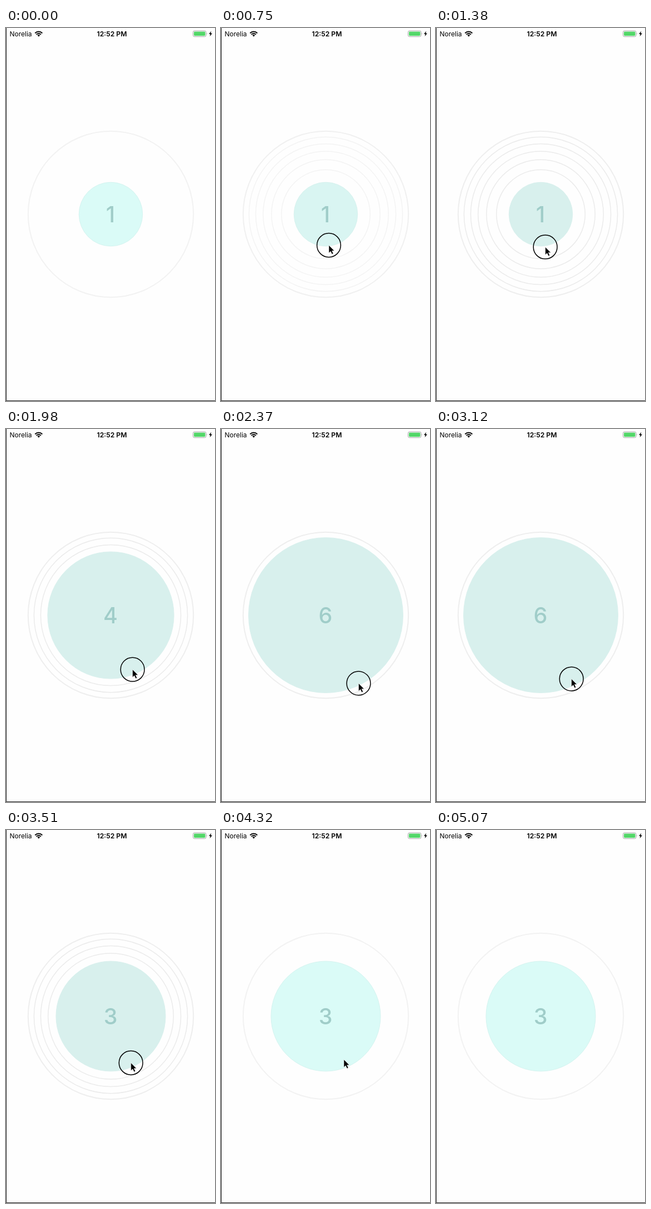
Write an HTML page that moves like this. It is 376 by 668 pixels and loops after 5.1 s.

```html
<!DOCTYPE html>
<html lang="en">
<head>
<meta charset="utf-8">
<title>Level dial</title>
<style>
  html, body { margin: 0; width: 100%; height: 100%; overflow: hidden; background: #fefefe; }
  svg { display: block; width: 100%; height: 100%; }
  text { font-family: Inter, "Liberation Sans", sans-serif; }
</style>
</head>
<body>
<svg viewBox="0 0 376 668">
  <rect width="376" height="668" fill="#fefefe"/>

  <g fill="none" transform="translate(188.5 333.5)">
    <circle id="outer" r="148.7" stroke-width="2"/>
    <g id="rings" stroke="#ebebeb" stroke-width="1.5"></g>
    <circle id="disc"/>
    <text id="num" x="-.5" y="14.5" font-size="39.5" font-weight="500" text-anchor="middle" fill="#a0cdc9"></text>
  </g>

  <g>
    <text x="6.5" y="14.5" font-size="12">Norelia</text>
    <g fill="none" stroke="#000" stroke-width="2">
      <path d="M52.3 9.2a9.2 9.2 0 0 1 13 0"/>
      <path d="M54.6 11.6a6 6 0 0 1 8.4 0"/>
    </g>
    <path d="M58.8 15.6l-2.3-2.4a3.3 3.3 0 0 1 4.6 0z"/>
    <text x="190.5" y="14.5" font-size="12.2" font-weight="600" text-anchor="middle">12:52 PM</text>
    <rect x="336.5" y="5" width="23.5" height="10.5" rx="2.6" fill="none" stroke="#a6a6a6"/>
    <rect x="338" y="6.5" width="20.5" height="7.5" rx="1.4" fill="#53d769"/>
    <path d="M361.3 8.5q1.6 1.7 0 3.5z" fill="#a6a6a6"/>
    <path d="M369.3 5.5l-4.3 5.3h2.6l-1 4.2 4.4-5.4h-2.7z"/>
  </g>

  <g id="cursor">
    <circle id="press" r="21.4" fill="none" stroke="#000" stroke-width="1.5"/>
    <path d="M0 0V14l3.2-3 2.5 5.2 2.4-1.1L5.7 10H10z" stroke="#fff" stroke-width=".6"/>
  </g>

  <path d="M.5 0V667.5H376" fill="none" stroke="#222"/>
</svg>
<script>
const LOOP = 5100, STEP = 30;
const CENTER = { x: 188.5, y: 333.5 };
const COUNT = 7, RADIUS = 149.2;
const DOWN = 570, UP = 3930, FADE = 330;

const below = { x: 206, y: 690 }, grab = { x: 194, y: 389 };
const far = { x: 252, y: 461 }, rest = { x: 221, y: 411 };
const away = { x: 240, y: 690 };
const LEGS = [
  { from: below, to: grab, start: 0, end: 540 },
  { from: grab, to: far, start: 1200, end: 2610 },
  { from: far, to: rest, start: 2820, end: 3700 },
  { from: rest, to: away, start: 4440, end: 5010 }
];

const $ = id => document.getElementById(id);
const set = (el, attrs) => { for (const k in attrs) el.setAttribute(k, attrs[k]); };
const clamp = (v, lo = 0, hi = 1) => Math.max(lo, Math.min(hi, v));
const ease = u => u * u * (3 - 2 * u);
const lerp = (a, b, k) => a + (b - a) * k;
const mix = (a, b, k) => `rgb(${a.map((v, i) => Math.round(lerp(v, b[i], k)))})`;

// every level adds the same area
const radius = level => RADIUS * Math.sqrt(level / COUNT);

const rings = Array.from({ length: COUNT - 1 }, (_, i) => {
  const ring = document.createElementNS("http://www.w3.org/2000/svg", "circle");
  set(ring, { r: radius(i + 1) });
  return $("rings").appendChild(ring);
});

function pointer(t) {
  const leg = LEGS.filter(l => l.start <= t).pop();
  const k = ease(clamp((t - leg.start) / (leg.end - leg.start)));
  return { x: lerp(leg.from.x, leg.to.x, k), y: lerp(leg.from.y, leg.to.y, k) };
}

// the level follows the pointer only while pressed
function levelAt(t) {
  const p = pointer(clamp(t, DOWN, UP));
  const reach = Math.hypot(p.x - CENTER.x, p.y - CENTER.y);
  let level = 1;
  while (level < COUNT && reach > radius(level) * 0.9 + 11.5) level++;
  return level;
}

function draw(t) {
  const level = levelAt(t), p = pointer(t);
  const active = clamp((t - DOWN) / FADE) - clamp((t - UP) / FADE);

  $("num").textContent = level;
  set($("disc"), {
    r: radius(level) + 0.8,
    fill: mix([218, 251, 247], [216, 240, 237], active),
    stroke: mix([212, 244, 240], [216, 240, 237], active)
  });
  set($("outer"), { stroke: mix([242, 242, 242], [238, 238, 238], active) });
  set($("rings"), { opacity: active });
  rings.forEach((ring, i) => set(ring, { visibility: i < level ? "hidden" : "visible" }));

  set($("cursor"), { transform: `translate(${p.x} ${p.y})` });
  set($("press"), { opacity: t >= DOWN && t < UP ? 1 : 0 });
}

const start = performance.now();
function tick() {
  const t = (performance.now() - start) % LOOP;
  draw(Math.floor(t / STEP) * STEP);
  requestAnimationFrame(tick);
}
tick();
</script>
</body>
</html>
```
